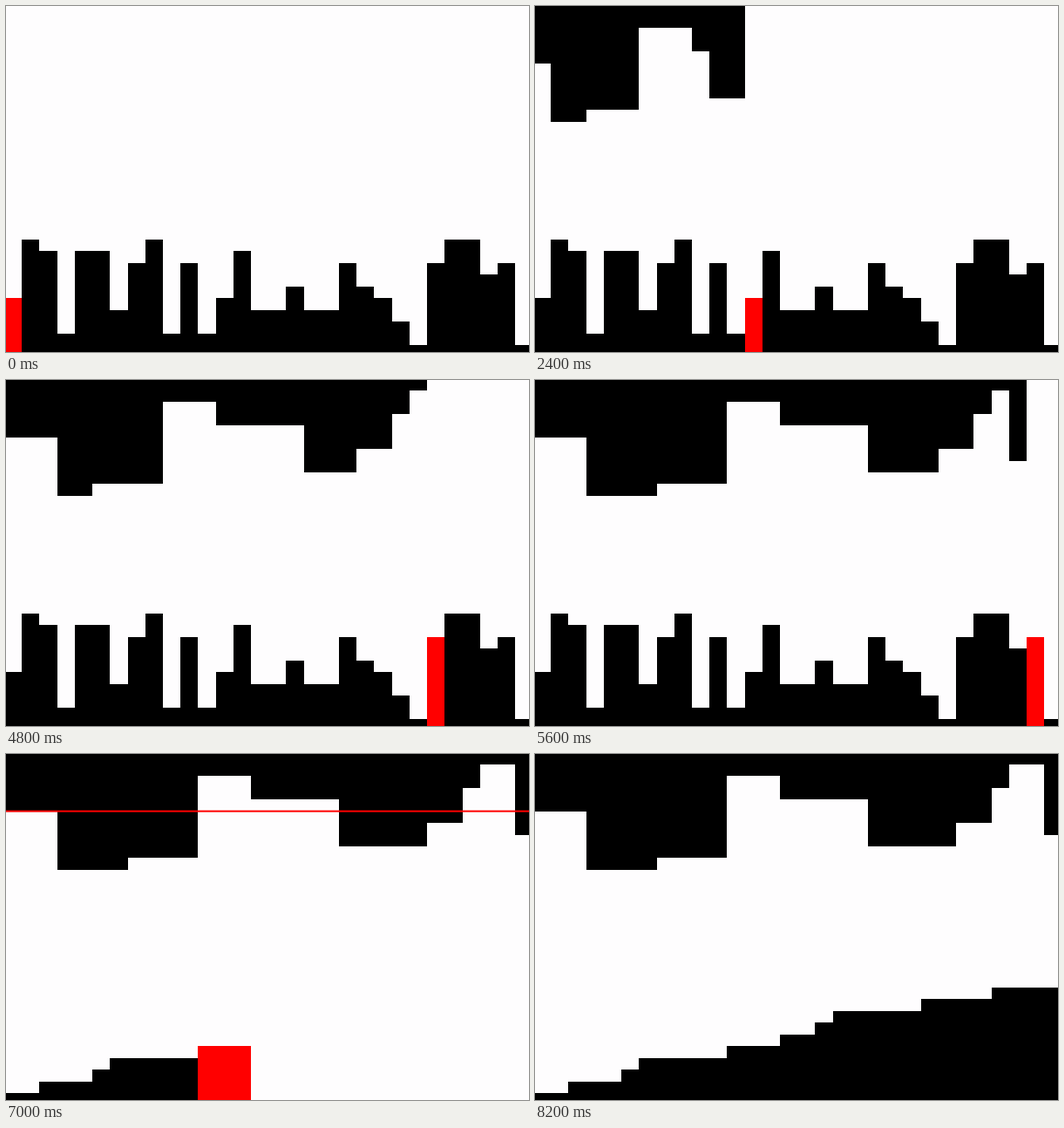
Animation of 600 by 397 pixels, one loop 9.8 s. Source, as an HTML page with a canvas:

```html
<!DOCTYPE html>
<html lang="en">
<head>
<meta charset="utf-8">
<title>Bucket sort</title>
<style>
  html, body { margin: 0; width: 100%; height: 100%; overflow: hidden; background: #fefdfe; }
  canvas { display: block; }
</style>
</head>
<body>
<canvas id="stage" width="600" height="397"></canvas>
<script>
const ctx = document.getElementById('stage').getContext('2d');
const W = 600, H = 397, STEP = 200, LOOP = 9800;
const PAPER = '#fefdfe', INK = '#000', MARK = '#f00';
const MAX = 10, UNIT = 13.45;
const values = [5, 10, 9, 2, 9, 9, 4, 8, 10, 2, 8, 2, 5, 9, 4, 4, 6, 4, 4, 8,
  6, 5, 3, 1, 8, 10, 10, 7, 8, 1];
const count = values.length;
const sorted = [...values].sort((a, b) => a - b);

const edge = i => Math.max(0, Math.round(20.21 * i - 1.95));
const depth = v => UNIT * v - 1.6;
const floorTop = v => Math.round(402.4 - UNIT * v);

function column(i, top, bottom, color) {
  ctx.fillStyle = color;
  ctx.fillRect(edge(i), top, edge(i + 1) - edge(i), bottom - top);
}

// Equal values hang together, buckets in order of first appearance.
function drawBuckets(taken) {
  const buckets = new Map();
  for (const v of values.slice(0, taken)) buckets.set(v, (buckets.get(v) || 0) + 1);
  let slot = 0;
  for (const [v, size] of buckets) {
    for (let n = 0; n < size; n++) column(slot++, 0, Math.round(depth(v)), INK);
  }
}

function drawBars(list, isMarked) {
  list.forEach((v, i) => column(i, floorTop(v), H, isMarked(v, i) ? MARK : INK));
}

function draw(step) {
  ctx.fillStyle = PAPER;
  ctx.fillRect(0, 0, W, H);
  drawBuckets(Math.min(step, count));
  if (step <= count) {
    drawBars(values, (v, i) => i === step);
    return;
  }
  const level = step - count;
  drawBars(sorted.filter(v => v <= level), v => v === level);
  if (level <= MAX) {
    ctx.fillStyle = MARK;
    ctx.fillRect(0, depth(level) - 1, W, 2);
  }
}

const start = performance.now();
let shown = -1;
function tick() {
  const t = (performance.now() - start) % LOOP;
  const step = Math.min(Math.floor(t / STEP), count + MAX + 1);
  if (step !== shown) draw(shown = step);
  requestAnimationFrame(tick);
}
tick();
</script>
</body>
</html>
```
